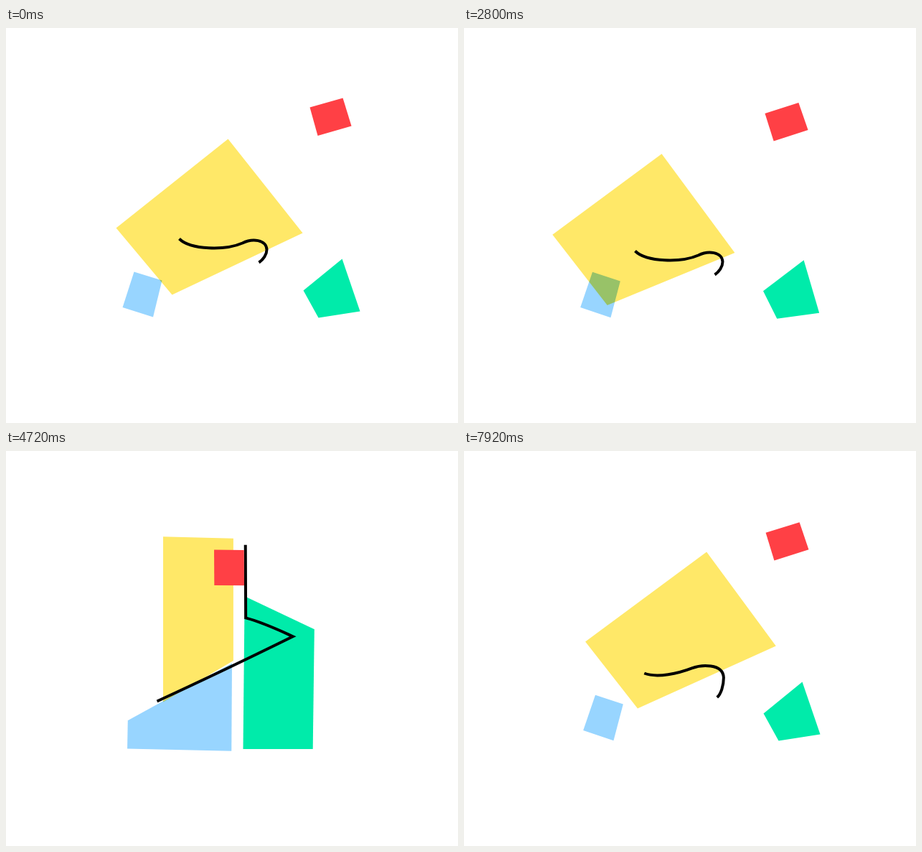
An HTML page with a canvas for the animation above (8000 ms loop, 630x550 px).

```html
<!DOCTYPE html>
<html lang="en">
<head>
<meta charset="utf-8">
<title>Shapes</title>
<style>
html, body { margin: 0; width: 100%; height: 100%; overflow: hidden; background: #fff; }
canvas { display: block; }
</style>
</head>
<body>
<canvas id="stage" width="630" height="550"></canvas>
<script>
const ctx = document.getElementById('stage').getContext('2d');
const LOOP = 8000, STEP = 80;

const smooth = p => (1 - Math.cos(Math.PI * p)) / 2;
const easeOut = p => 1 - (1 - p) ** 3;
const backIn = p => p * p * (2.2 * p - 1.2);
const spring = p => 1 - Math.exp(-1.5 * p) * (1 - p) * Math.cos(3 * Math.PI * p);
const settle = p => easeOut(Math.min(1, p * 1.3));
const mix = (a, b, p) => a.map((v, i) => v + (b[i] - v) * p);

// Four corners from two sides and the heights at them; lean shifts the bottom
const slab = (x0, x1, tl, tr, br, bl, lean = 0) =>
  [x0, tl, x1, tr, x1 + lean, br, x0 + lean, bl];

// Straight segments as curves, with control points at their thirds
function zigzag(...p) {
  const out = p.slice(0, 2);
  for (let i = 0; i < p.length - 2; i += 2)
    for (let k = 1; k <= 3; k++)
      out.push(...mix(p.slice(i, i + 2), p.slice(i + 2, i + 4), k / 3));
  return out;
}

// Drift: shift x, shift y, turn in degrees, stretch along the first edge
const yellow = {
  home: [153, 278, 309, 154, 413, 285, 231, 371],
  pile: slab(316, 357, 288, 283, 343, 343),
  tower: slab(244, 327, 163, 163.5, 305, 347.5),
  drift: [[-4, 21, 0, -.03], [-33, 18, 2, -.05], [1, -5.5, -1.3], [19, -13.5, 2, .055]]
};
const red = {
  soft: true,
  home: [423, 110, 469, 97, 481, 136, 434, 149.5],
  pile: slab(313, 356, 295, 294, 343, 344, 2),
  tower: slab(285.5, 327, 110, 110.5, 160, 159.5),
  drift: [[7, 0], [-3, 7, -2, .03], [3, -1, -1], [-2, 2, -1.5, .03]]
};
const green = {
  home: [414, 365, 468, 321, 493, 394, 435, 403],
  pile: slab(324, 365, 285, 279.5, 338, 336, 6),
  tower: slab(330, 412.5, 223.5, 256, 394.5, 394),
  drift: [[-3, 0, -6, -.04], [2.5, 1.5, 2, .02], [.5, 4, .8], [3, 0, 0]]
};
const blue = {
  home: [178, 339, 217, 351, 204.5, 402, 162, 388.5],
  pile: slab(327, 370, 303, 303, 342, 345, 2),
  tower: slab(210.5, 329, 356, 297, 397.5, 396),
  drift: [[1.5, -1.5, 3], [0, .5, 1], [0, 0, -.5], [4, .5, 1]]
};
const line = {
  soft: true,
  home: [241, 293, 257, 309, 306, 309, 329, 299, 343, 292, 362, 294, 363, 308, 363, 315, 358, 322, 352, 326],
  arch: [254, 308, 274, 309, 291, 297, 306, 292, 317, 289, 356, 283, 357, 308, 357, 322, 354, 337, 349, 342],
  tower: zigzag(203, 355, 413.5, 250.5, 330.5, 218, 330, 94),
  drift: [[0, 0], [-3, 17], [0, 8], [2, 7]]
};
line.rest = mix(line.home, line.arch, .6);
line.pile = move(line.rest, [2, 5]).map(v => Math.min(v, 352));

function move(p, [dx, dy, turn = 0, stretch = 0]) {
  const mean = k => p.reduce((s, v, i) => i % 2 === k ? s + v : s, 0) * 2 / p.length;
  const cx = mean(0), cy = mean(1);
  const edge = Math.atan2(p[3] - p[1], p[2] - p[0]), end = edge + turn * Math.PI / 180;
  const out = [];
  for (let i = 0; i < p.length; i += 2) {
    const x = p[i] - cx, y = p[i + 1] - cy;
    const a = (x * Math.cos(edge) + y * Math.sin(edge)) * (1 + stretch);
    const b = (y * Math.cos(edge) - x * Math.sin(edge)) * (1 - stretch / 2);
    out.push(cx + dx + a * Math.cos(end) - b * Math.sin(end),
             cy + dy + a * Math.sin(end) + b * Math.cos(end));
  }
  return out;
}

// Time, pose, drift (0 is none), easing into it
const beats = [
  [0, 'home', 0], [1600, 'arch', 1, smooth], [2800, 'home', 2, smooth],
  [3560, 'home', 0, smooth], [4100, 'pile', 0, backIn], [4400, 'pile', 0, smooth],
  [5280, 'tower', 0, spring], [5600, 'tower', 0, smooth], [6960, 'tower', 3, smooth],
  [7100, 'tower', 3, smooth], [7800, 'rest', 4, easeOut], [LOOP, 'rest', 4, smooth]
];

function pose(shape, [, name, n]) {
  const p = shape[name] || shape.home;
  return n ? move(p, shape.drift[n - 1]) : p;
}

function shapeAt(shape, t) {
  const i = beats.findIndex(b => b[0] > t);
  const from = beats[i - 1], to = beats[i];
  const ease = shape.soft && to[3] === spring ? settle : to[3];
  return mix(pose(shape, from), pose(shape, to), ease((t - from[0]) / (to[0] - from[0])));
}

const sway = (t, start, end) =>
  t > start && t < end ? Math.sin(Math.PI * (t - start) / (end - start)) ** 2 : 0;

function trace(p) {
  ctx.beginPath();
  for (let i = 0; i < p.length; i += 2) ctx.lineTo(p[i], p[i + 1]);
  ctx.closePath();
}

function fill(p, color, blend = 'source-over') {
  ctx.globalCompositeOperation = blend;
  trace(p);
  ctx.fillStyle = color;
  ctx.fill();
  ctx.globalCompositeOperation = 'source-over';
}

function drawLine(p) {
  ctx.beginPath();
  ctx.moveTo(p[0], p[1]);
  for (let i = 2; i < p.length; i += 6) ctx.bezierCurveTo(...p.slice(i, i + 6));
  ctx.lineWidth = 4;
  ctx.stroke();
}

function draw(t) {
  const swing = -21 * sway(t, 0, 900) - 38 * sway(t, 7120, 7920);
  const r = shapeAt(red, t), g = shapeAt(green, t), b = shapeAt(blue, t);

  ctx.clearRect(0, 0, 630, 550);
  ctx.save();
  ctx.translate(.5, .5);
  fill(b, '#98d5ff');
  fill(g, '#00ebaa');
  fill(move(shapeAt(yellow, t), [swing, 0]), '#ffe868', 'multiply');
  drawLine(shapeAt(line, t));
  fill(r, '#ff4045');

  // Overlaps with red turn dark
  trace(r);
  ctx.clip();
  fill(b, '#4d4236');
  fill(g, '#000');
  ctx.restore();
}

function tick() {
  const t = performance.now() % LOOP;
  draw(Math.floor(t / STEP) * STEP);
  requestAnimationFrame(tick);
}
tick();
</script>
</body>
</html>
```
